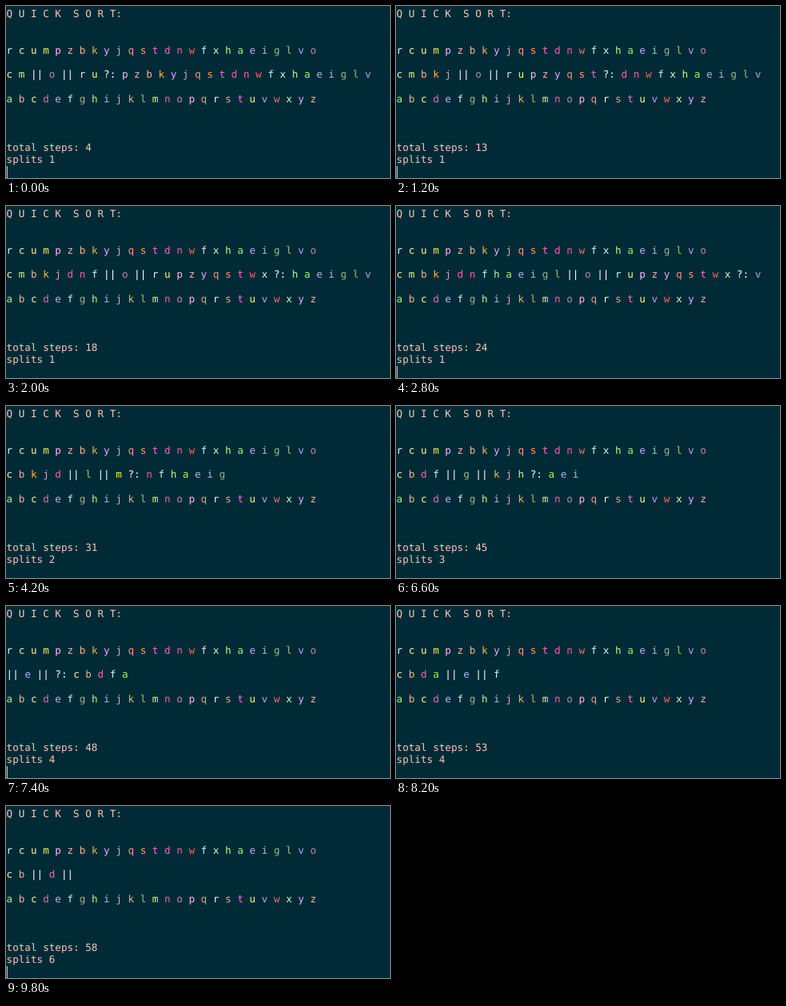
An HTML page for the animation above (10000 ms loop, 480x216 px).

```html
<!DOCTYPE html>
<html lang="en">
<head>
<meta charset="utf-8">
<title>Quick sort</title>
<style>
html, body { margin: 0; width: 100%; height: 100%; overflow: hidden; background: #002b36; }
svg { display: block; width: 100%; height: 100%; }
text {
  font: 12.62px "DejaVu Sans Mono", monospace;
  white-space: pre;
  text-rendering: geometricPrecision;
  fill: #f8c8ba;
}
</style>
</head>
<body>
<svg viewBox="0 0 480 216"></svg>
<script>
const LOOP = 10000, TICK = 200;    // screen refresh
const STEP = 140.5, LEAD = 75;     // pace of the sort
const BLINK = 1200;
const LETTERS = "rcumpzbkyjqstdnwfxhaeiglvo";
const INK = {
  a: "#a0f468", b: "#f0b592", c: "#fbf8b4", d: "#ff58bc", e: "#b9acfa",
  f: "#c8fbfa", g: "#9eb08c", h: "#b8fa94", i: "#a9bcd6", j: "#d2a5b8",
  k: "#fdb347", l: "#b2bd6c", m: "#f8f84e", n: "#ea60a6", o: "#b287b6",
  p: "#fcbcf6", q: "#ee9484", r: "#dcf5e8", s: "#ff9c68", t: "#ff66d6",
  u: "#fdfb84", v: "#b7a0fa", w: "#f26664", x: "#d6fbd2", y: "#e4a8fc",
  z: "#fdb4ae"
};

const svg = document.querySelector("svg");

function add(tag, attrs) {
  const el = document.createElementNS("http://www.w3.org/2000/svg", tag);
  for (const key in attrs) el.setAttribute(key, attrs[key]);
  return svg.appendChild(el);
}

function addRow(n, text = "") {
  const el = add("text", { x: 0.6, y: 13.9 + n * 15.25 });
  el.innerHTML = text;
  return el;
}

const paint = words => words
  .map(w => `<tspan fill="${INK[w] || "#ffffff"}">${w}</tspan>`)
  .join(" ");

// Every screen the sort passes through, in order
function trace(list) {
  const states = [];
  let steps = 0, splits = 0;
  while (list.length > 1) {
    const pivot = list[list.length - 1];
    const rest = list.slice(0, -1);
    const less = [], more = [];
    const show = () => {
      const left = rest.slice(less.length + more.length);
      const words = [...less, "||", pivot, "||", ...more];
      if (left.length) words.push("?:", ...left);
      states.push({ line: paint(words), steps, splits });
    };
    show();
    splits++;
    show();
    for (const item of rest) {
      (item < pivot ? less : more).push(item);
      steps++;
      show();
    }
    show();
    list = less.length > 1 ? less : more;
  }
  return states;
}

const states = trace([...LETTERS]);
const first = states.findIndex(s => s.steps === 4);

addRow(0, "Q U I C K  S O R T:");
addRow(3, paint([...LETTERS]));
const work = addRow(5);
addRow(7, paint([...LETTERS].sort()));
const steps = addRow(11);
const splits = addRow(12);
const cursor = add("rect", { x: 0.8, y: 201, width: 1, height: 15, fill: "#e4e8e6" });

let shown = null;
function render(time) {
  const t = Math.floor((time % LOOP) / TICK) * TICK;
  const i = first + Math.floor((t + LEAD) / STEP);
  const state = states[Math.min(i, states.length - 1)];
  if (state !== shown) {
    work.innerHTML = state.line;
    steps.textContent = "total steps: " + state.steps;
    splits.textContent = "splits " + state.splits;
    shown = state;
  }
  cursor.setAttribute("visibility", t % BLINK < BLINK / 2 ? "visible" : "hidden");
}

const start = performance.now();
function loop() {
  render(performance.now() - start);
  requestAnimationFrame(loop);
}
loop();
</script>
</body>
</html>
```
